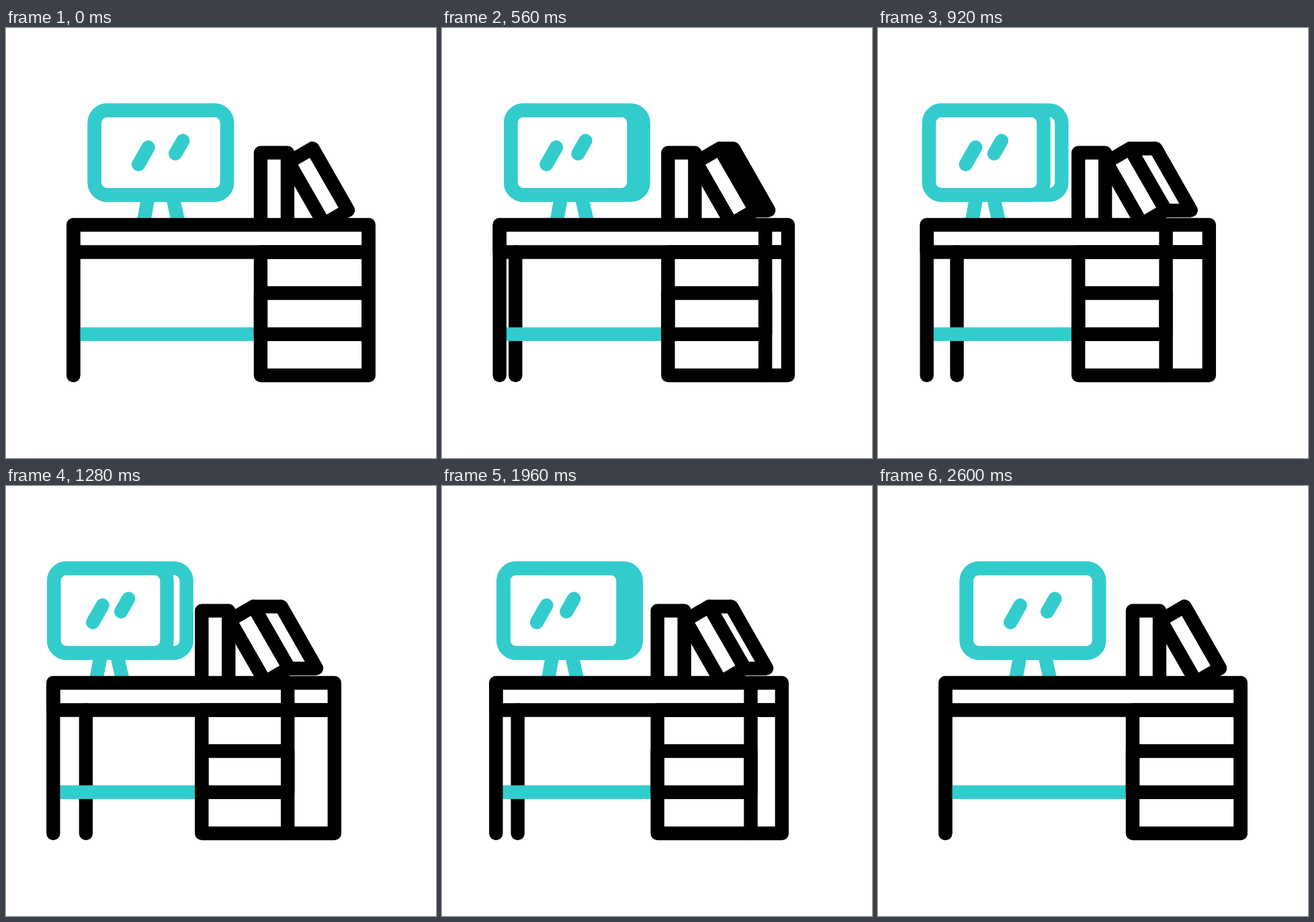
These frames come from a looping animation (640 px wide and 640 px high, 3 s). An HTML page without scripts:

```html
<!DOCTYPE html>
<html lang="en">
<head>
<meta charset="utf-8">
<title>Turning desk</title>
<style>
  /* turn: whole desk, shine: screen highlights, back: rear edge of the tilted book */
  @property --turn  { syntax: "<number>"; inherits: true; initial-value: 0; }
  @property --shine { syntax: "<number>"; inherits: true; initial-value: 0; }
  @property --back  { syntax: "<number>"; inherits: true; initial-value: 0; }

  html, body { margin: 0; width: 100%; height: 100%; overflow: hidden; background: #fff; }

  svg {
    display: block;
    width: 100%;
    height: 100%;
    fill: none;
    stroke: #000;
    stroke-width: 20.4px;
    stroke-linecap: round;
    stroke-linejoin: round;
    animation: turn 3s infinite, shine 3s infinite, back 3s infinite;

    /* x of the desk's uprights */
    --left:   calc(100.3px - 30.1px * var(--turn));
    --rear:   calc(100.3px + 18.7px * var(--turn));
    --drawer: calc(379px - 88px * var(--turn));
    --front:  calc(539.7px - 120.9px * var(--turn));
    --right:  calc(539.7px - 51px * var(--turn));
  }

  .teal { stroke: #3cc; }
  .solid { stroke: none; fill: #000; }
  .bar { stroke: none; fill: #3cc; x: var(--left); width: calc(var(--drawer) - var(--left)); }

  .at-left  { transform: translateX(var(--left)); }
  .at-rear  { transform: translateX(var(--rear)); }
  .at-front { transform: translateX(var(--front)); }
  .top      { x: var(--left); width: calc(var(--right) - var(--left)); }
  .cabinet  { x: var(--drawer); width: calc(var(--right) - var(--drawer)); }
  .drawers  { x: var(--drawer); width: calc(var(--front) - var(--drawer)); }

  .books     { transform: translateX(calc(-88px * var(--turn))); }
  .book-back { transform: translateX(calc(-47px * var(--back))); }
  .book-side { width: calc(88px * var(--turn) - 47px * var(--back)); }

  .monitor { transform: translateX(calc(-60.7px * var(--turn))); }
  .screen  { width: calc(197.4px - 29.2px * var(--turn)); }
  .foot-l  { transform: translateX(calc(-71px * var(--turn))); }
  .foot-r  { transform: translateX(calc(-83.2px * var(--turn))); }
  .shine-l { transform: translateX(calc(-68px * var(--shine))); }
  .shine-r { transform: translateX(calc(-81px * var(--shine))); }

  @keyframes turn {
    0%, 86.667%, 100% { --turn: 0; }
    6.667%  { --turn: 0; animation-timing-function: cubic-bezier(.47, 0, .01, 1); }
    46.667% { --turn: 1; }
    49.333% { --turn: 1; animation-timing-function: cubic-bezier(.616, 0, .367, 1); }
  }
  @keyframes shine {
    0%, 86.667%, 100% { --shine: 0; }
    6.667%  { --shine: 0; animation-timing-function: cubic-bezier(.5, 0, .13, 1); }
    36.667% { --shine: 1; }
    53.333% { --shine: 1; animation-timing-function: cubic-bezier(.66, 0, .38, 1); }
  }
  @keyframes back {
    0%, 86.667%, 100% { --back: 0; }
    6.667%  { --back: 0; animation-timing-function: cubic-bezier(.47, 0, .01, 1); }
    46.667% { --back: 1; }
    49.333% { --back: 1; animation-timing-function: cubic-bezier(.616, 0, .367, 1.41); }
  }
</style>
</head>
<body>
<svg viewBox="0 0 640 640">
  <g class="teal">
    <g stroke-linecap="butt">
      <path class="foot-l" d="M211.3 254L205 288"/>
      <path class="foot-r" d="M248.7 254L256.3 288"/>
    </g>
    <g class="monitor">
      <rect x="131.7" y="122.5" width="197.4" height="126" rx="18.5"/>
      <rect class="screen" x="131.7" y="122.5" height="126" rx="18.5"/>
    </g>
    <path class="shine-l" d="M211.7 177.5L197.2 203"/>
    <path class="shine-r" d="M263.2 167.8L252.2 187"/>
  </g>

  <path class="book-back" d="M456.7 179.6L508.9 271.2"/>
  <g class="books">
    <path d="M379 293V185.6H419V293"/>
    <path d="M420.8 199.8L456 179.3L508.9 271.2L473.5 291.7Z"/>
    <g class="solid">
      <rect class="book-side" x="456.7" y="169.2" height="20.4"/>
      <rect class="book-side" x="508.9" y="261.5" height="20.4"/>
    </g>
  </g>

  <path class="at-rear" d="M0 333.5V517"/>
  <rect class="bar" y="445.5" height="20.4"/>
  <path class="at-left" d="M0 293V517"/>
  <rect class="top" y="293" height="40.5"/>
  <rect class="cabinet" y="333.5" height="183.5"/>
  <rect class="drawers" y="394.5" height="61.2"/>
  <path class="at-front" d="M0 293V517"/>
</svg>
</body>
</html>
```
